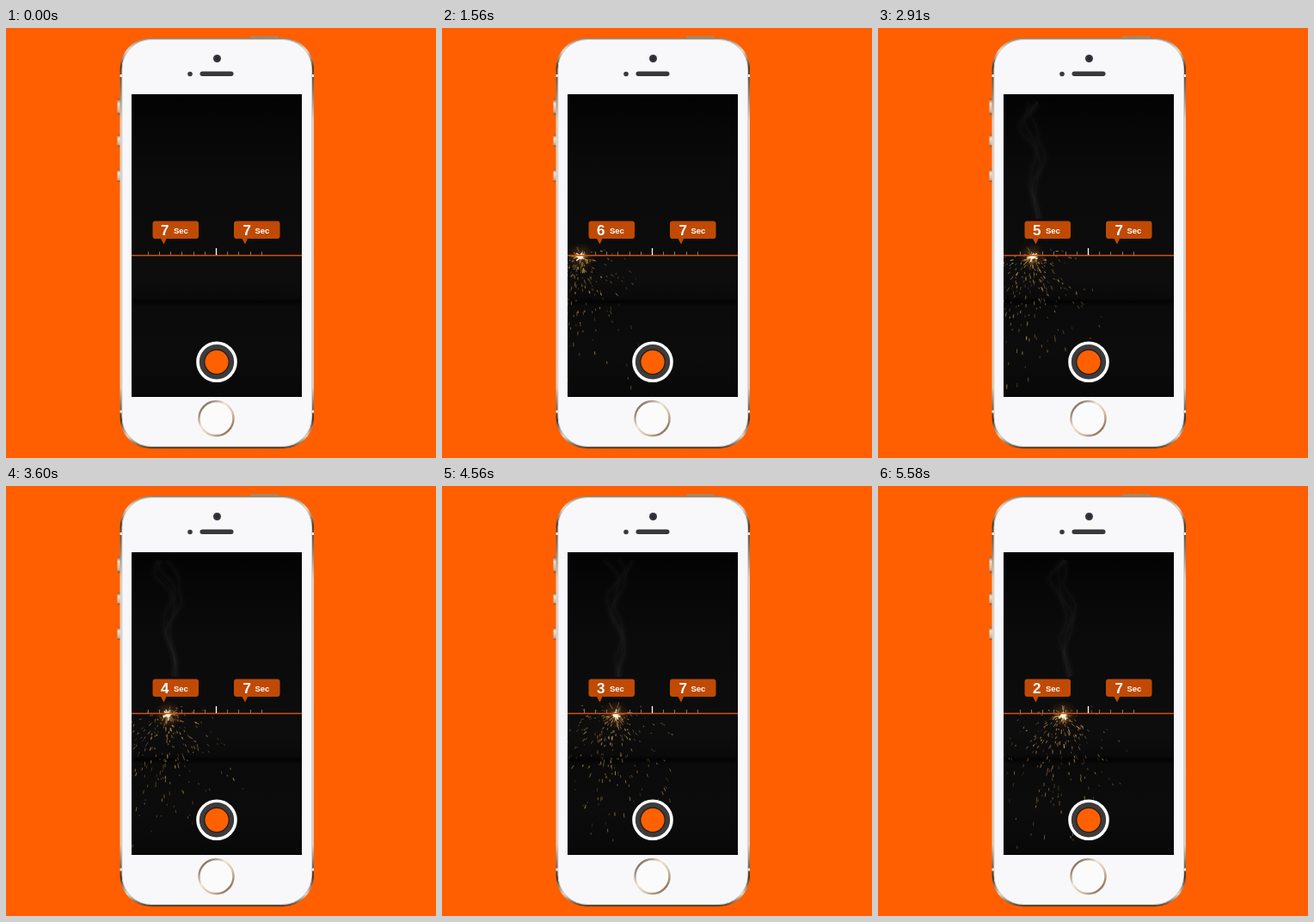
An HTML page with a canvas that plays this animation: 500 by 500 pixels, repeating every 5.61 s.

```html
<!DOCTYPE html>
<html lang="en">
<head>
<meta charset="utf-8">
<title>Sparkler timer</title>
<style>
  html, body { margin: 0; width: 100%; height: 100%; overflow: hidden; background: #ff5f00; }
  svg, canvas { position: absolute; left: 0; top: 0; }
  text { font-family: "Liberation Sans", Arial, sans-serif; font-weight: bold; fill: #fff; }
</style>
</head>
<body>
<svg width="500" height="500">
  <defs>
    <linearGradient id="edge" x1="0" y1="0" x2="0" y2="1">
      <stop offset="0" stop-color="#94826f"/>
      <stop offset=".03" stop-color="#e8dccd"/>
      <stop offset=".07" stop-color="#4a3a28"/>
      <stop offset=".13" stop-color="#8d7c66"/>
      <stop offset=".2" stop-color="#dfd2c1"/>
      <stop offset=".85" stop-color="#dccfbe"/>
      <stop offset=".93" stop-color="#3f2f20"/>
      <stop offset=".97" stop-color="#e4d5c3"/>
      <stop offset="1" stop-color="#4c3b28"/>
    </linearGradient>
    <linearGradient id="ring" x1="0" y1="0" x2="1" y2="1">
      <stop offset="0" stop-color="#4d3a28"/>
      <stop offset=".4" stop-color="#f1e6d8"/>
      <stop offset=".65" stop-color="#d6c0a5"/>
      <stop offset="1" stop-color="#64492f"/>
    </linearGradient>
    <linearGradient id="key" x1="0" y1="0" x2="0" y2="1">
      <stop offset="0" stop-color="#7d5a3e"/>
      <stop offset=".3" stop-color="#f3e3d3"/>
      <stop offset=".8" stop-color="#cdb196"/>
      <stop offset="1" stop-color="#6e4c32"/>
    </linearGradient>
  </defs>
  <rect x="284" y="9.5" width="33" height="5" rx="1.5" fill="#a08b72"/>
  <g fill="url(#key)">
    <rect x="129.5" y="82" width="4" height="19" rx="1"/>
    <rect x="129.5" y="124" width="4" height="14" rx="1"/>
    <rect x="129.5" y="164" width="4" height="15" rx="1"/>
  </g>
  <rect x="132.5" y="11.5" width="225.5" height="477.5" rx="36" fill="url(#edge)"/>
  <path d="M132.500 55.500h225.500M132.500 446h225.500" stroke="#f5efe9" stroke-width="3"/>
  <rect x="135" y="13.5" width="220.5" height="473" rx="34" fill="#f8f8fa" stroke="#d6d3cd"/>
  <circle cx="245.5" cy="35.5" r="4.5" fill="#36343a"/>
  <circle cx="245.5" cy="35.5" r="2" fill="#262a3c"/>
  <circle cx="214" cy="53.5" r="2.8" fill="#3b393d"/>
  <rect x="225.5" y="50.5" width="39" height="5.5" rx="2.75" fill="#39373a"/>
  <circle cx="244.5" cy="454" r="20" fill="#fbfbfb" stroke="url(#ring)" stroke-width="2.4"/>
</svg>

<canvas id="video" width="198" height="352" style="left:146px;top:77px"></canvas>

<svg width="500" height="500">
  <path d="M146 264.500h198" stroke="#d24f10" stroke-width="1.300"/>
  <path d="M165.500 260v4M178.500 260v4M191.500 260v4M204.500 260v4M218.500 260v4M231.500 260v4M257.500 260v4M270.500 260v4M284.500 260v4M297.500 260v4" stroke="#777"/>
  <path d="M244.500 256v8" stroke="#fff" stroke-width="1.300"/>
  <g id="badge">
    <path d="M173.500 224.500h47.500a3 3 0 0 1 3 3v14.500a3 3 0 0 1-3 3h-34.500l-3 6.500l-3.500-6.500h-6.500a3 3 0 0 1-3-3v-14.500a3 3 0 0 1 3-3z" fill="#c04a04"/>
    <text x="195" y="239" font-size="9.5">Sec</text>
  </g>
  <use href="#badge" x="94.500"/>
  <text id="count" x="180" y="241" font-size="17">7</text>
  <text x="275.500" y="241" font-size="17">7</text>
  <circle cx="245" cy="388.300" r="22" fill="#3d3b3b" stroke="#fff" stroke-width="3.600"/>
  <circle cx="245" cy="388.300" r="14.200" fill="#ff6000" stroke="#1f1b19" stroke-width="1.200"/>
</svg>

<script>
const LOOP = 5610, STEP = 30, IGNITE = 640, SPARKS = 270, FUSE_Y = 266, DRAG = 0.35;
const ctx = document.getElementById('video').getContext('2d');
const count = document.getElementById('count');
const clamp = v => Math.max(0, Math.min(1, v));
const rand = n => { const v = Math.sin(n * 127.1 + 11.7) * 43758.5453; return v - Math.floor(v); };
const fuseX = t => 140.2 + t * 0.01345;

function backdrop() {
  const g = ctx.createLinearGradient(0, 77, 0, 429);
  [[0, '#030303'], [0.09, '#060606'], [0.25, '#0a0a0a'], [0.6, '#0d0d0d'], [0.67, '#0a0a0a'],
   [0.685, '#030303'], [0.7, '#0a0a0a'], [0.85, '#0c0c0c'], [1, '#080808']]
    .forEach(([p, c]) => g.addColorStop(p, c));
  ctx.fillStyle = g;
  ctx.fillRect(146, 77, 198, 352);
}

// Faint wisps that climb from the flame and drift with it.
function smoke(t) {
  const rise = clamp((t - 1700) / 650);
  const top = 215 - 130 * rise;
  for (let w = 0; rise && w < 3; w++) {
    ctx.beginPath();
    for (let y = 222; y >= top; y -= 4) {
      const h = (222 - y) / 137;
      const x = fuseX(t) + 6 - 6 * h + (w - 1) * 9 * h
        + (3 + 6 * h) * Math.sin(y / (11 + 2 * w) + t / 420 + w * 1.7)
        + 3 * h * Math.sin(y / 6 + t / 300 + w * 2);
      ctx.lineTo(x, y);
    }
    for (const [width, alpha] of [[10, 0.012], [5, 0.012], [1.5, 0.02]]) {
      ctx.lineWidth = width;
      ctx.strokeStyle = `rgba(190,190,190,${alpha * rise})`;
      ctx.stroke();
    }
  }
}

// Sparks shoot out radially, slow down in the air and then fall.
function sparks(t) {
  for (let i = 0; i < SPARKS; i++) {
    const life = 350 + 600 * rand(i);
    const phase = t + life * rand(i + 300);
    const turn = Math.floor(phase / life);
    const age = phase - turn * life, born = t - age;
    if (born < IGNITE) continue;
    const seed = i * 7.31 + turn * 91.7, s = age / 1000;
    const angle = (rand(seed) + rand(seed + 1) - 1) * 2.5;
    const reach = (18 + 135 * rand(seed + 2)) * (0.65 + 0.35 * Math.cos(angle));
    const rx = reach * Math.sin(angle), ry = reach * Math.cos(angle);
    const slow = Math.exp(-s / DRAG);
    const x = fuseX(born) + rx * (1 - slow), y = FUSE_Y + ry * (1 - slow) + 85 * s * s;
    const dx = rx * slow / DRAG, dy = ry * slow / DRAG + 170 * s;
    const speed = Math.hypot(dx, dy) || 1;
    const len = 1.5 + 4 * rand(seed + 4) * clamp(speed / 180);
    const glow = (0.3 + 0.6 * rand(seed + 5)) * (1 - 0.45 * age / life);
    ctx.strokeStyle = `rgba(${205 + 35 * rand(seed + 6)},${155 + 35 * rand(seed + 7)},95,${glow})`;
    ctx.lineWidth = 0.7 + 0.5 * rand(seed + 8);
    ctx.beginPath();
    ctx.moveTo(x, y);
    ctx.lineTo(x - dx / speed * len, y - dy / speed * len);
    ctx.stroke();
  }
}

function flame(t) {
  if (t < IGNITE) return;
  const x = fuseX(t), tick = Math.floor(t / STEP);
  const g = ctx.createRadialGradient(x, FUSE_Y, 0, x, FUSE_Y, 17);
  g.addColorStop(0, 'rgba(255,200,110,.6)');
  g.addColorStop(0.3, 'rgba(210,130,50,.24)');
  g.addColorStop(1, 'rgba(150,70,10,0)');
  ctx.fillStyle = g;
  ctx.fillRect(x - 17, FUSE_Y - 17, 34, 34);
  for (let i = 0; i < 28; i++) {
    const core = i < 9;
    const n = tick * 37 + i, a = rand(n) * 2 * Math.PI, r = 4 + 12 * rand(n + 0.4) ** 2;
    const from = core ? 0 : r * 0.5, to = core ? Math.min(r, 6.5) : r;
    ctx.strokeStyle = core ? '#fff4d0' : 'rgba(240,190,110,.6)';
    ctx.lineWidth = core ? 1.2 : 0.7;
    ctx.beginPath();
    ctx.moveTo(x + from * Math.cos(a), FUSE_Y + from * Math.sin(a));
    ctx.lineTo(x + to * Math.cos(a), FUSE_Y + to * Math.sin(a));
    ctx.stroke();
  }
  ctx.fillStyle = '#fffbe8';
  ctx.beginPath();
  ctx.arc(x, FUSE_Y, 2.8, 0, 7);
  ctx.fill();
}

function draw() {
  const t = Math.floor(performance.now() % LOOP / STEP) * STEP;
  ctx.setTransform(1, 0, 0, 1, -146, -77);
  backdrop();
  smoke(t);
  sparks(t);
  flame(t);
  count.textContent = 7 - Math.floor(t / 1000);
  requestAnimationFrame(draw);
}
draw();
</script>
</body>
</html>
```
